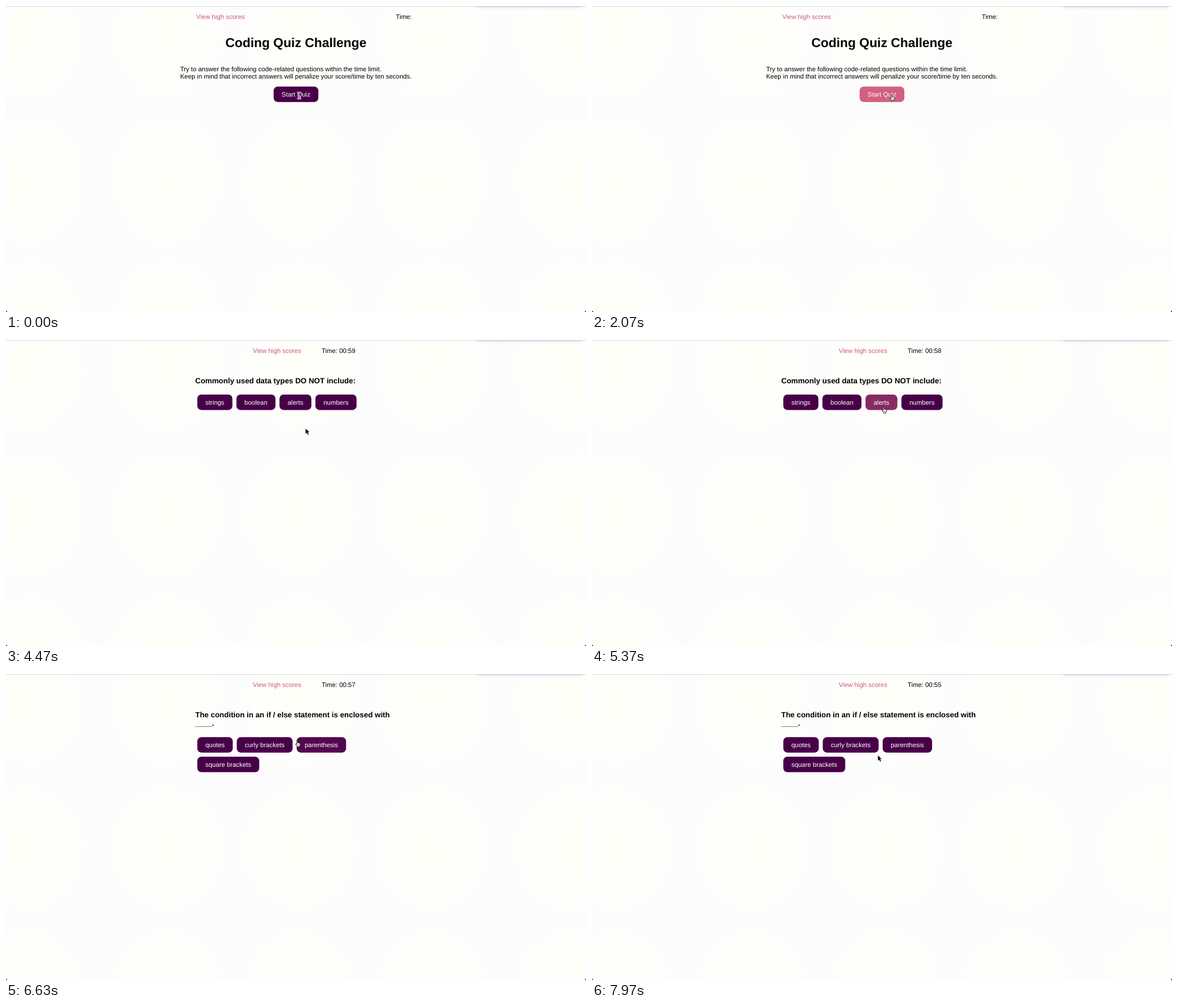
An HTML page for the animation above (8000 ms loop, 1029 by 544 pixels).

```html
<!DOCTYPE html>
<html lang="en">
<head>
<meta charset="utf-8">
<title>Coding quiz</title>
<style>
  html, body { margin: 0; width: 100%; height: 100%; overflow: hidden; background: #fdfdfd; }
  svg { display: block; width: 1029px; height: 544px; }
  text {
    font: 11.43px "Liberation Sans", Arial, sans-serif;
    text-rendering: geometricPrecision;
    white-space: pre;
  }
  .title { font-size: 22.87px; font-weight: bold; }
  .question { font-size: 13.37px; font-weight: bold; }
  .link { fill: #cf5880; }
  .label { fill: #fff; }
</style>
</head>
<body>
<svg id="stage" viewBox="0 0 1029 544" xmlns="http://www.w3.org/2000/svg">
  <defs>
    <radialGradient id="cream">
      <stop offset="0" stop-color="#fffff8"/>
      <stop offset=".45" stop-color="#fffff9" stop-opacity=".8"/>
      <stop offset="1" stop-color="#fffffa" stop-opacity="0"/>
    </radialGradient>
    <filter id="soft" x="-10%" y="-200%" width="120%" height="500%">
      <feGaussianBlur stdDeviation="2.5"/>
    </filter>
  </defs>
  <rect width="1029" height="544" fill="#fcfcfe"/>
  <g id="glow"></g>
  <rect x="836" y="-10" width="186" height="11" fill="#a29cc4" opacity=".75" filter="url(#soft)"/>
  <rect width="1029" height="1" fill="#d3d3de"/>
  <path d="M0 544V540.5Q.4 543.6 3.5 544ZM1029 544V540.5Q1028.6 543.6 1025.5 544Z"/>

  <g id="header">
    <text id="link" class="link" y="22.7">View high scores</text>
    <text id="clock" y="22.7"></text>
  </g>
  <g id="intro">
    <text class="title" x="389.3" y="73.2">Coding Quiz Challenge</text>
    <text x="309" y="115.9">Try to answer the following code-related questions within the time limit.</text>
    <text x="309" y="129.1">Keep in mind that incorrect answers will penalize your score/time by ten seconds.</text>
  </g>
  <g id="types">
    <text class="question" x="335.8" y="76.6">Commonly used data types DO NOT include:</text>
  </g>
  <g id="condition">
    <text class="question" x="335.8" y="76.6">The condition in an if / else statement is enclosed with</text>
    <text class="question" x="335.8" y="91.8">____.</text>
  </g>

  <g id="cursor">
    <g id="beam" fill="none" stroke-linecap="round">
      <path id="beamPath" stroke="#e6dfe6" stroke-width="2"
        d="M-2.6-5.6Q0-5.6 0-3.6V3.6Q0 5.6-2.6 5.6M2.6-5.6Q0-5.6 0-3.6M0 3.6Q0 5.6 2.6 5.6M-1.6 2.4H1.6"/>
      <use href="#beamPath" style="--w:.7"/>
      <path stroke="#55405a" stroke-width=".7"
        d="M-2.6-5.6Q0-5.6 0-3.6V3.6Q0 5.6-2.6 5.6M2.6-5.6Q0-5.6 0-3.6M0 3.6Q0 5.6 2.6 5.6M-1.6 2.4H1.6"/>
    </g>
    <g id="hand">
      <path fill="#fff" stroke="#111" stroke-width=".9" stroke-linejoin="round"
        d="M-.9 1.2C-1 0 .6-.1 .8 1.1L1.3 4.3C1.6 3.7 2.6 3.8 2.8 4.5C3.2 4 4.1 4.2 4.2 4.9C4.9 4.6 5.6 5 5.6 5.8L5.4 8.4L4.5 9.8V11.2H.1V10L-2.6 7C-3.3 5.9-2.1 5.2-1.4 5.9L-.3 6.9Z"/>
      <path fill="none" stroke="#111" stroke-width=".5" d="M1 7V9.3M2.4 7V9.3M3.8 7V9.3"/>
    </g>
    <path id="arrow" stroke="#fff" stroke-width="1.2" paint-order="stroke" stroke-linejoin="round"
      d="M.3 .3V9.5L2.4 7.5L4.1 11.4L5.7 10.7L4 6.9H6.8Z"/>
  </g>
</svg>
<script>
const NS = 'http://www.w3.org/2000/svg';
const $ = id => document.getElementById(id);
const LOOP = 8000, FADE = 500;
const START = 2900, NEXT = 6560, TICK = 1000;
const DARK = [71, 0, 72], PINK = [210, 97, 128];

function add(parent, tag, attrs) {
  const el = document.createElementNS(NS, tag);
  for (const key in attrs) el.setAttribute(key, attrs[key]);
  return parent.appendChild(el);
}

for (const cx of [40, 285, 520, 755, 1000])
  for (const cy of [50, 310, 565])
    add($('glow'), 'ellipse', { cx, cy, rx: 135, ry: 150, fill: 'url(#cream)' });

// Lays labelled buttons out in a row and returns their boxes.
function buttonRow(parent, x, y, labels) {
  return labels.map(label => {
    const box = add(parent, 'rect', { x, y, height: 27.4, rx: 7.15, fill: `rgb(${DARK})` });
    const text = add(parent, 'text', { x: x + 14.3, y: y + 17.8, class: 'label' });
    text.textContent = label;
    const width = text.getComputedTextLength() + 28.6;
    box.setAttribute('width', width);
    x += width + 7.15;
    return box;
  });
}

const [startButton] = buttonRow($('intro'), 474.8, 143.3, ['Start Quiz']);
const alerts = buttonRow($('types'), 339.4, 97, ['strings', 'boolean', 'alerts', 'numbers'])[2];
const parenthesis = buttonRow($('condition'), 339.4, 112.3, ['quotes', 'curly brackets', 'parenthesis'])[2];
buttonRow($('condition'), 339.4, 147.1, ['square brackets']);

// button, hover start, hover end
const hovers = [
  [startButton, 1220, LOOP],
  [alerts, 5235, LOOP],
  [parenthesis, 6585, 7060],
];

// time, x, y of the pointer's hot spot
const track = [
  [0, 520, 159.2], [1150, 520, 159.2], [1500, 531.3, 157.2], [4900, 531.3, 157.2],
  [5340, 517.2, 119], [6400, 517.2, 119], [6540, 516.4, 118.4], [7030, 516.4, 118.4],
  [7450, 507, 144.4], [LOOP, 507, 144.4],
];

const shapes = [[0, 'beam'], [1220, 'hand'], [START, 'arrow'], [5235, 'hand'], [7060, 'arrow']];

const clamp = v => Math.min(1, Math.max(0, v));

// The CSS "ease" curve, solved by bisection.
function ease(x) {
  const curve = (s, a, b) => 3 * s * (1 - s) ** 2 * a + 3 * s * s * (1 - s) * b + s ** 3;
  let low = 0, high = 1;
  for (let i = 0; i < 18; i++) {
    const mid = (low + high) / 2;
    if (curve(mid, .25, .25) < x) low = mid; else high = mid;
  }
  return curve(low, .1, 1);
}

function pointer(t) {
  const i = track.findIndex(key => key[0] > t);
  const [t0, x0, y0] = track[i - 1], [t1, x1, y1] = track[i];
  const p = (t - t0) / (t1 - t0), s = p * p * (3 - 2 * p);
  return [x0 + (x1 - x0) * s, y0 + (y1 - y0) * s];
}

const show = (id, on) => $(id).setAttribute('visibility', on ? 'visible' : 'hidden');

function render(t) {
  show('intro', t < START);
  show('types', t >= START && t < NEXT);
  show('condition', t >= NEXT);

  const ticks = Math.floor((t - START) / TICK);
  const running = ticks > 0;
  const linkX = t < START ? 337.6 : running ? 437.8 : 453.8;
  $('link').setAttribute('x', linkX);
  $('clock').setAttribute('x', t < START ? 691.6 : linkX + 122.1);
  $('clock').textContent = running ? `Time: 00:${60 - ticks}` : 'Time:';

  for (const [button, from, to] of hovers) {
    const amount = ease(clamp((t - from) / FADE)) - ease(clamp((t - to) / FADE));
    const rgb = DARK.map((c, i) => Math.round(c + (PINK[i] - c) * clamp(amount)));
    button.setAttribute('fill', `rgb(${rgb})`);
  }

  const shape = shapes.filter(([from]) => t >= from).pop()[1];
  for (const id of ['beam', 'hand', 'arrow']) show(id, id === shape);
  $('cursor').setAttribute('transform', `translate(${pointer(t)})`);
}

function frame(now) {
  render(now % LOOP);
  requestAnimationFrame(frame);
}
render(0);
requestAnimationFrame(frame);
</script>
</body>
</html>
```
